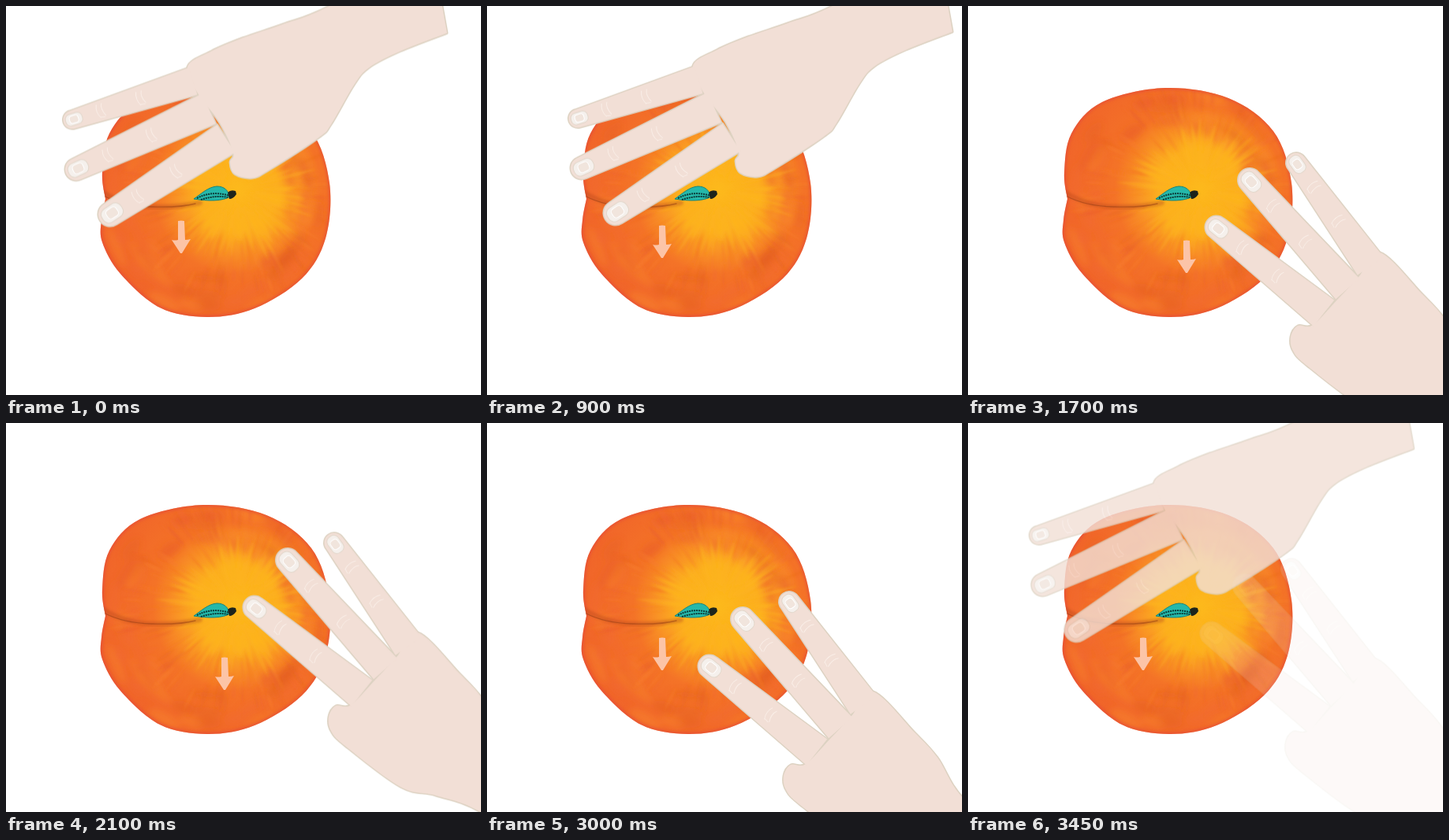
Animation, 602 px wide and 494 px high, one loop 3500 ms. Source, as an HTML page:

```html
<!DOCTYPE html>
<html lang="en">
<head>
<meta charset="utf-8">
<title>Peach and hands</title>
<style>
  html, body { margin: 0; width: 100%; height: 100%; overflow: hidden; background: #fff; }
  svg { display: block; width: 602px; height: 494px; }
  .move { animation: 3500ms linear infinite; }
  .arrow { animation: 3500ms step-end infinite; }
  #back { animation-name: back; }
  #front { animation-name: front; }
  #down { animation-name: down; }
  #up { animation-name: up; }

  /* Each hand strokes twice, then fades over to the other one. */
  @keyframes back {
    0% { transform: none; opacity: 1; }
    7.7% { transform: translate(0, 112px); }
    16%, 17.1% { transform: none; }
    24%, 25.34% { transform: translate(31px, -8px); }
    32% { transform: translate(31px, 104px); }
    39.57% { transform: translate(31px, -8px); opacity: 1; }
    46.6% { opacity: 0; }
    92.4% { transform: translate(31px, -8px); opacity: 0; }
    100% { transform: none; opacity: 1; }
  }
  @keyframes front {
    0%, 39.57% { transform: translate(0, 24px); opacity: 0; }
    46.9% { transform: translate(0, 24px); opacity: 1; }
    53.4% { transform: translate(0, 112px); }
    60% { transform: none; }
    72% { transform: translate(-33px, 75px); }
    74.29% { transform: translate(-33px, 112px); }
    78.86% { transform: translate(-33px, 187px); }
    85.71%, 92.4% { transform: translate(-33px, 75px); opacity: 1; }
    100% { transform: translate(0, 24px); opacity: 0; }
  }
  @keyframes down {
    0%, 17.1%, 79%, 100% { transform: translate(222px, 272px); opacity: 1; }
    25.2% { transform: translate(222px, 278px); opacity: 1; }
    46.9%, 59.5% { transform: translate(277px, 297px); opacity: 1; }
    8%, 32.3%, 53.4%, 64.2% { opacity: 0; }
  }
  @keyframes up {
    0%, 17.1%, 41.4%, 59.5%, 70%, 100% { opacity: 0; }
    8%, 32.3%, 53.4%, 64.2% { opacity: 1; }
  }
</style>
</head>
<body>
<svg viewBox="0 0 602 494">
  <defs>
    <radialGradient id="flesh" gradientUnits="userSpaceOnUse" cx="293" cy="233" r="185">
      <stop offset="0" stop-color="#fdb91b"/>
      <stop offset=".28" stop-color="#fcae1f"/>
      <stop offset=".42" stop-color="#f99325"/>
      <stop offset=".58" stop-color="#f47327"/>
      <stop offset="1" stop-color="#f0632a"/>
    </radialGradient>
    <filter id="soft" x="-20%" y="-20%" width="140%" height="140%"><feGaussianBlur stdDeviation="1.6"/></filter>
    <filter id="haze" x="-20%" y="-20%" width="140%" height="140%"><feGaussianBlur stdDeviation="4"/></filter>
    <clipPath id="skin"><path id="clip"/></clipPath>
  </defs>

  <path id="body" fill="url(#flesh)"/>
  <g clip-path="url(#skin)">
    <g id="patches" filter="url(#haze)"></g>
    <g id="rays" filter="url(#soft)"></g>
    <path id="rim" fill="none" stroke="#e2463c" stroke-width="5" opacity=".5" filter="url(#soft)"/>
    <g fill="none" stroke-linecap="round">
      <path d="M122 236Q150 254 185 255T246 250" stroke="#b8481c" stroke-width="6" opacity=".4" filter="url(#soft)"/>
      <path d="M124 241Q148 254 185 255T240 251" stroke="#8f3d14" stroke-width="1.4" opacity=".5"/>
    </g>
  </g>

  <g>
    <path d="M238 245C248 238 256 230 267 229C277 229 281 234 284 242C275 248 256 248 238 245Z" fill="#25b8aa" stroke="#14847c"/>
    <path d="M242 244Q262 234 283 241M247 246Q265 240 281 243" fill="none" stroke="#0b3937" stroke-width="2" stroke-dasharray="2 1"/>
    <path d="M281 237Q284 233 291 235L292 239Q288 245 283 245Z" fill="#1d241c"/>
  </g>

  <defs><path id="arrow" d="M-4 1Q0 0 4 1L5 25Q9 25 12 24L1 42H-1L-12 25Q-8 26-4 25Z"/></defs>
  <g fill="#fcc4a7">
    <g id="down" class="arrow"><use href="#arrow"/></g>
    <g id="up" class="arrow"><use href="#arrow" transform="translate(206 309) scale(1 -1)"/></g>
  </g>

  <g id="front" class="move"></g>
  <g id="back" class="move"></g>
</svg>

<script>
const NS = 'http://www.w3.org/2000/svg';
const byId = id => document.getElementById(id);

function add(parent, tag, attrs) {
  const node = document.createElementNS(NS, tag);
  for (const key in attrs) node.setAttribute(key, attrs[key]);
  return parent.appendChild(node);
}

// Smooth curve through "x,y" points, closed by a straight line.
function curve(text) {
  const p = text.trim().split(/\s+/).map(s => s.split(',').map(Number));
  const at = i => p[Math.max(0, Math.min(p.length - 1, i))];
  let d = 'M' + p[0];
  for (let i = 0; i < p.length - 1; i++) {
    const [a, b, c, e] = [at(i - 1), at(i), at(i + 1), at(i + 2)];
    const c1 = b.map((v, k) => v + (c[k] - a[k]) / 6);
    const c2 = c.map((v, k) => v - (e[k] - b[k]) / 6);
    d += `C${c1} ${c2} ${c}`;
  }
  return d + 'Z';
}

let seed = 11;
const rand = (lo, hi) => {
  seed = (seed * 16807) % 2147483647;
  return lo + (hi - lo) * seed / 2147483647;
};

function paintPeach() {
  const shape = curve(`126,245 122,212 131,162 170,122 250,104 330,117 387,159 410,225
    405,295 375,346 315,384 255,395 195,383 145,340 122,300 121,272 126,245`);
  for (const id of ['body', 'clip', 'rim']) byId(id).setAttribute('d', shape);

  const turn = () => rand(0, 2 * Math.PI);
  const tones = ['#e4552a', '#fa8a2c', '#f26a35', '#e0601c'];

  // Broad brush marks that follow the round of the fruit.
  for (let i = 0; i < 70; i++) {
    const a = turn(), r = rand(.65, 1);
    add(byId('patches'), 'ellipse', {
      rx: rand(10, 28), ry: rand(3, 8), fill: tones[i % 4], opacity: rand(.25, .5),
      transform: `translate(${266 + 142 * r * Math.cos(a)} ${250 + 142 * r * Math.sin(a)}) rotate(${a * 180 / Math.PI + 90})`
    });
  }

  const ray = (angle, from, to, width, fill, opacity) => add(byId('rays'), 'path', {
    d: `M${from} 0Q${(from + to) / 2} ${width} ${to} 0Q${(from + to) / 2} ${-width} ${from} 0`,
    transform: `translate(293 233) scale(1 .92) rotate(${angle * 180 / Math.PI})`, fill, opacity
  });
  for (let i = 0; i < 120; i++) {
    const r = rand(80, 130);
    ray(turn(), r, r + rand(20, 50), rand(2, 6), tones[i % 4], rand(.12, .3));
  }
  for (let i = 0; i < 100; i++)
    ray(turn(), rand(10, 40), rand(70, 108), rand(3, 7), '#fdb41d', rand(.3, .6));
  for (let i = 0; i < 70; i++)
    ray(turn(), rand(55, 75), rand(92, 125), rand(1, 4), '#f5781f', rand(.3, .5));
}

// A finger tapers from tip radius r to base radius R; nail and folds follow its axis.
function finger({ tip: [x, y], r, base: [bx, by], R }) {
  const angle = Math.atan2(by - y, bx - x) * 180 / Math.PI;
  const length = Math.hypot(bx - x, by - y);
  return {
    length, r,
    place: `translate(${x} ${y}) rotate(${angle})`,
    d: `M${length} ${R}L0 ${r}A${r} ${r} 0 0 1 0 ${-r}L${length} ${-R}Z`
  };
}

function paintHand(id, palm, keys) {
  const hand = byId(id);
  const fingers = keys.map(finger);
  const layer = attrs => {
    const g = add(hand, 'g', { 'stroke-linejoin': 'round', ...attrs });
    add(g, 'path', { d: curve(palm) });
    for (const f of fingers) add(g, 'path', { d: f.d, transform: f.place });
  };
  layer({ fill: 'none', stroke: '#ddd2c2', 'stroke-width': 3 });
  layer({ fill: '#f2dfd6' });

  for (const { place, r, length } of fingers) {
    const g = add(hand, 'g', { transform: place });
    add(g, 'rect', { x: -.75 * r, y: -.65 * r, width: 1.9 * r, height: 1.3 * r, rx: .55 * r, fill: '#f5f0ec', stroke: '#e3d8cc' });
    add(g, 'rect', { x: -.3 * r, y: -.42 * r, width: r, height: .84 * r, rx: .3 * r, fill: '#f1e5dd', stroke: '#fff' });
    for (const at of [.24, .57])
      add(g, 'path', {
        d: 'M-4-9Q-8 0-3 9M3-9Q-1-2 4 8M-3 8L3 9', transform: `translate(${length * at} 0)`,
        fill: 'none', stroke: '#fbf1eb', opacity: .8
      });
  }
}

paintPeach();

paintHand('back',
  `559,34 500,57 460,78 441,100 412,150 396,167 333,208 312,218 290,213 284,198 288,186
   271,148 244,112 230,77 260,57 300,40 350,23 409,0 540,-72`, [
  { tip: [84, 144], r: 11.5, base: [237, 95], R: 18 },
  { tip: [89, 207], r: 14, base: [257, 130], R: 21 },
  { tip: [132, 264], r: 15, base: [279, 168], R: 21 }
]);

paintHand('front',
  `700,560 602,494 545,473 500,462 430,410 412,391 409,373 418,359 437,358
   467,327 495,297 522,266 575,318 604,350 638,403 720,470`, [
  { tip: [416, 152], r: 12.5, base: [510, 283], R: 20 },
  { tip: [357, 174], r: 14.5, base: [481, 312], R: 20 },
  { tip: [315, 234], r: 14, base: [451, 343], R: 21 }
]);
</script>
</body>
</html>
```
